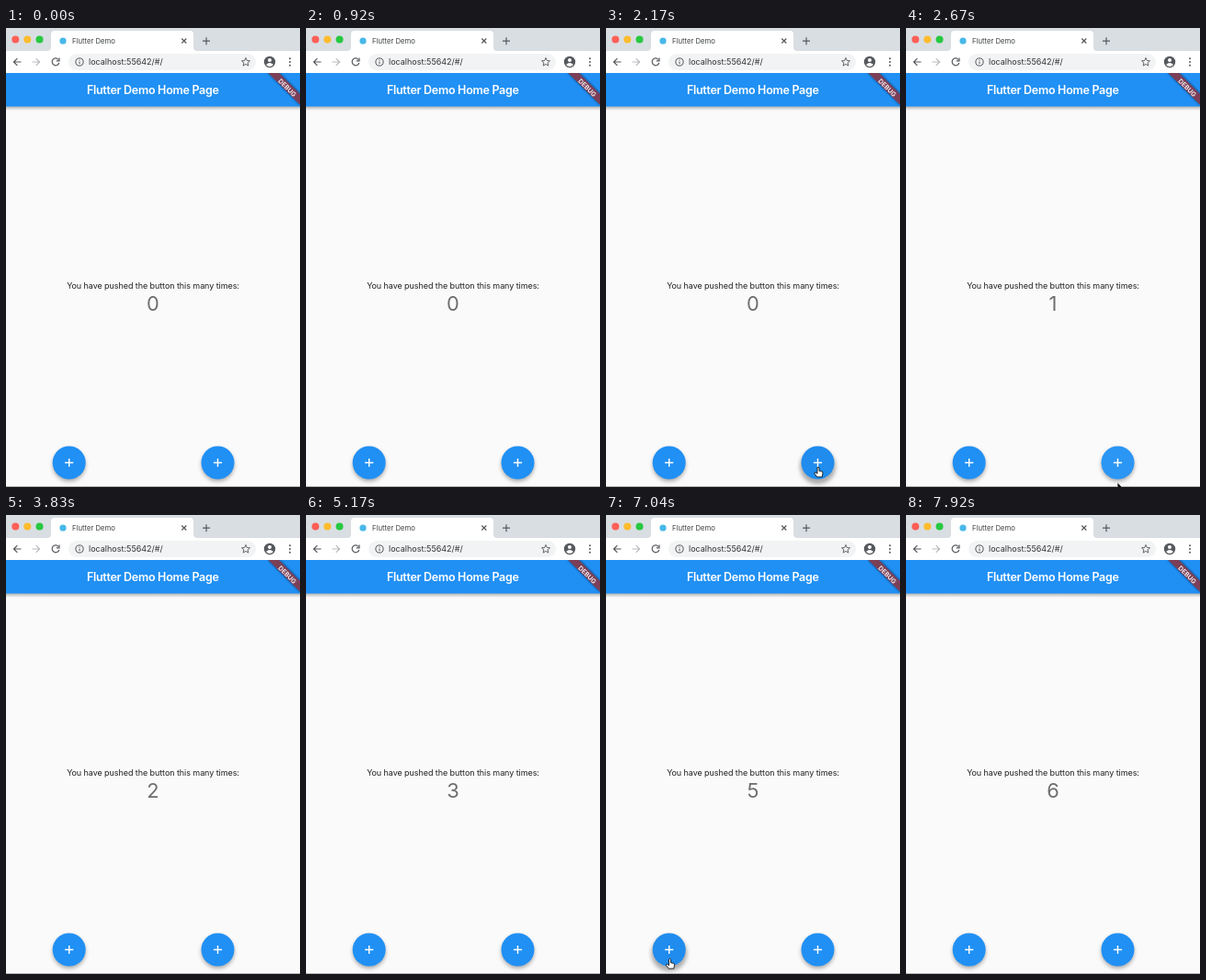
Write an HTML page that moves like this. It is 320x500 px and loops after 8000 ms.

```html
<!DOCTYPE html>
<html lang="en">
<head>
<meta charset="utf-8">
<title>Counter demo</title>
<style>
  html, body { margin: 0; width: 100%; height: 100%; overflow: hidden; background: #fafafa; }
  svg { display: block; width: 320px; height: 500px; font-family: Inter, "Noto Sans", sans-serif; }
  .icon { fill: none; stroke: #55585c; stroke-width: 1.2; }
  .fab { fill: #2090f4; }
  .fab.hover { fill: #1f8cee; }
</style>
</head>
<body>
<svg viewBox="0 0 320 500">
  <defs>
    <linearGradient id="barShadow" x2="0" y2="1">
      <stop stop-color="#444" stop-opacity=".42"/>
      <stop offset="1" stop-color="#444" stop-opacity="0"/>
    </linearGradient>
    <filter id="blur" x="-40%" y="-40%" width="180%" height="180%"><feGaussianBlur stdDeviation="2.2"/></filter>
    <filter id="ribbonBlur"><feGaussianBlur stdDeviation="1.2"/></filter>
    <clipPath id="disc"><circle r="18"/></clipPath>
    <clipPath id="bar"><path d="M0 49H320V86H0Z"/></clipPath>
    <g id="fabShape">
      <circle class="shadow" cy="2.6" r="18" fill="#404040" opacity=".42" filter="url(#blur)"/>
      <circle class="fab" r="18"/>
      <circle class="ripple" r="0" fill="#fff" opacity="0" clip-path="url(#disc)"/>
      <path d="M-4.6 0H4.6M0-4.6V4.6" stroke="#fff" stroke-width="1.4"/>
    </g>
  </defs>

  <rect width="320" height="500" fill="#fafafa"/>

  <!-- Browser tab strip -->
  <rect width="320" height="25" fill="#d9dee3"/>
  <circle cx="10.3" cy="12.5" r="4" fill="#fe5f57"/>
  <circle cx="23.3" cy="12.5" r="4" fill="#febc2e"/>
  <circle cx="36.5" cy="12.5" r="4" fill="#28c840"/>
  <path d="M45 25Q49 25 49 21V7Q49 3 53 3H200Q204 3 204 7V21Q204 25 208 25Z" fill="#fff"/>
  <circle cx="62" cy="14" r="3.6" fill="#48b8e8"/>
  <text x="72" y="16.8" font-size="7.7" fill="#3c4043">Flutter Demo</text>
  <path class="icon" d="M191.3 11.5l5 5m0-5l-5 5M214 14.2h8m-4-4v8"/>

  <!-- Browser toolbar -->
  <rect y="25" width="320" height="24" fill="#fff"/>
  <rect x="68" y="28" width="204" height="18" rx="9" fill="#f1f3f4"/>
  <path class="icon" d="M16.5 37H8.5m3.8-3.9L8.4 37l3.9 3.9"/>
  <path class="icon" d="M28.5 37h8m-3.8-3.9l3.9 3.9l-3.9 3.9" style="stroke:#b8babd"/>
  <path class="icon" d="M57 34.3A3.9 3.9 0 1 0 57.8 38M58 32.6v3.2h-3.2"/>
  <circle class="icon" cx="80" cy="37" r="4.1" style="stroke-width:1"/>
  <path class="icon" d="M80 36.6v2.5M80 34.6v1" style="stroke-width:1"/>
  <text x="90" y="40.2" font-size="9" fill="#303336">localhost:55642/#/</text>
  <path class="icon" d="M261 32.5l1.3 3 3.2.3-2.4 2.1.7 3.2-2.8-1.7-2.8 1.7.7-3.2-2.4-2.1 3.2-.3Z" style="stroke-width:.9"/>
  <circle cx="287" cy="37" r="6.2" fill="#55585c"/>
  <circle cx="287" cy="35" r="2" fill="#fff"/>
  <path d="M283 40Q287 36.2 291 40Q287 44 283 40" fill="#fff"/>
  <g fill="#55585c"><circle cx="309" cy="33.3" r="1"/><circle cx="309" cy="37" r="1"/><circle cx="309" cy="40.7" r="1"/></g>

  <!-- App bar with its corner ribbon -->
  <rect y="85" width="320" height="5" fill="url(#barShadow)"/>
  <rect y="49" width="320" height="36.5" fill="#2090f4"/>
  <text x="159.8" y="72" font-size="12.5" font-weight="600" letter-spacing="-.28" fill="#fff" text-anchor="middle">Flutter Demo Home Page</text>
  <g clip-path="url(#bar)">
    <path d="M285 49h13l22 22v13Z" fill="#181820" opacity=".55" filter="url(#ribbonBlur)"/>
    <path d="M285.5 49h11.5l23 23v11.5Z" fill="#7b3f58"/>
  </g>
  <text transform="translate(306 65.2) rotate(45)" y="2.2" font-size="7" font-weight="600" fill="#fff" text-anchor="middle">DEBUG</text>

  <!-- App body -->
  <text x="160" y="284.2" font-size="9" letter-spacing="-.07" fill="#202020" text-anchor="middle">You have pushed the button this many times:</text>
  <text id="count" x="160" y="307.5" font-size="21.9" fill="#6e6e6e" text-anchor="middle">0</text>
  <g id="left" transform="translate(68.7 473.5)"></g>
  <g id="right" transform="translate(230.5 473.5)"></g>
  <path d="M0 499.5H320" stroke="#b8b8b8"/>

  <g id="cursor">
    <path id="arrow" d="M0 0V10.5L2.5 8.2L4.2 12L6 11.2L4.3 7.5H7.5Z" fill="#111" stroke="#fff" stroke-width=".7"/>
    <path id="hand" d="M0 1Q1-.4 2 1V4.6L4.8 5.1Q6.2 5.4 6 7L5.3 11H-.4L-3 7.2Q-3.2 5.8-1.8 6.1L0 7.4Z" fill="#fff" stroke="#111" stroke-width=".9" stroke-linejoin="round"/>
  </g>
</svg>
<script>
  const LOOP = 8000, MOVE = 300, RIPPLE = 450;
  const $ = id => document.getElementById(id);
  const buttons = { left: $('left'), right: $('right') };
  for (const button of Object.values(buttons)) {
    for (const part of $('fabShape').children) button.append(part.cloneNode(true));
  }

  // Each visit enters from below, presses once and leaves again.
  const visits = [
    { side: 'right', from: 1790, press: 2330, to: 2720 },
    { side: 'left',  from: 2800, press: 3240, to: 3650 },
    { side: 'right', from: 4120, press: 4580, to: 5000 },
    { side: 'left',  from: 5260, press: 5680, to: 6080 },
    { side: 'right', from: 6230, press: 6560, to: 6860 },
    { side: 'left',  from: 6880, press: 7200, to: 7500 }
  ];
  const cursorX = { left: 68.5, right: 230 };
  const clamp = v => Math.max(0, Math.min(1, v));
  const easeOut = v => 1 - (1 - clamp(v)) ** 2;

  function drawButton(side, hover, age) {
    const button = buttons[side];
    button.querySelector('.fab').classList.toggle('hover', hover);
    const shadow = button.querySelector('.shadow');
    shadow.setAttribute('r', hover ? 19.5 : 18);
    shadow.setAttribute('cy', hover ? 4 : 2.6);
    const active = age >= 0 && age < RIPPLE;
    const ripple = button.querySelector('.ripple');
    ripple.setAttribute('r', active ? 18 * easeOut(age / 250) : 0);
    ripple.setAttribute('opacity', active ? .22 * (1 - age / RIPPLE) : 0);
  }

  function draw(t) {
    $('count').textContent = visits.filter(v => t >= v.press).length;
    const visit = visits.find(v => t >= v.from && t < v.to);
    let over = false;
    $('cursor').style.display = visit ? '' : 'none';
    if (visit) {
      const reach = Math.min(easeOut((t - visit.from) / MOVE), easeOut((visit.to - t) / MOVE));
      const y = 502 - 24 * reach;
      over = y < 491;
      $('cursor').setAttribute('transform', `translate(${cursorX[visit.side]} ${y})`);
      $('hand').style.display = over ? '' : 'none';
      $('arrow').style.display = over ? 'none' : '';
    }
    for (const side in buttons) {
      const last = visits.filter(v => v.side === side && t >= v.press).pop();
      drawButton(side, over && visit.side === side, last ? t - last.press : -1);
    }
  }

  const start = performance.now();
  function tick() {
    draw((performance.now() - start) % LOOP);
    requestAnimationFrame(tick);
  }
  tick();
</script>
</body>
</html>
```
